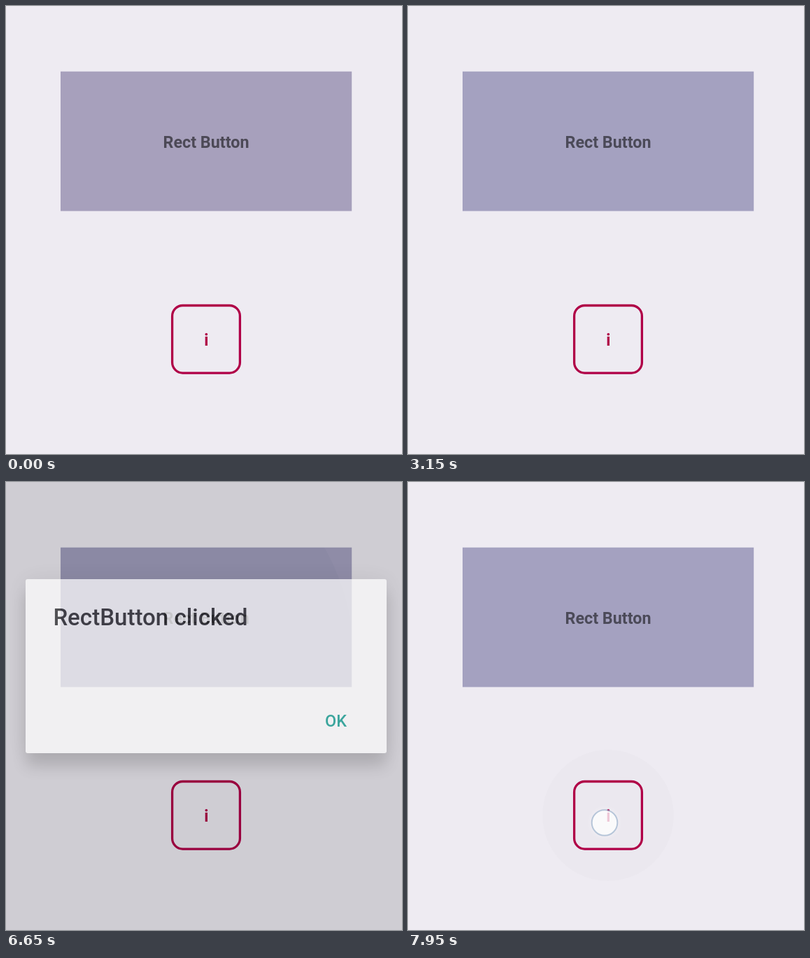
Recreate the animation shown at these times as an HTML page. Size 566 px wide and 641 px high, loop 8 s.

```html
<!DOCTYPE html>
<html lang="en">
<head>
<meta charset="utf-8">
<title>Buttons</title>
<style>
  html, body { margin: 0; width: 100%; height: 100%; overflow: hidden; background: #eeebf2; }
  svg, #dialog { position: absolute; left: 0; top: 0; width: 566px; height: 641px; display: block; }
  text { font-family: Roboto, Inter, sans-serif; font-size: 23.33px; }
  .bold { font-weight: 700; }
  .medium { font-weight: 500; }
  #dialog { overflow: hidden; }
  #card {
    position: absolute; left: 28px; top: 139px; width: 516px; height: 249px;
    border-radius: 3px; background: #fff;
    box-shadow: 0 20px 22px rgba(0, 0, 0, .19), 0 2px 32px rgba(0, 0, 0, .11);
  }
</style>
</head>
<body>
<svg viewBox="0 0 566 641">
  <defs>
    <clipPath id="rectClip"><rect x="78" y="93.7" width="416.2" height="199.7"/></clipPath>
  </defs>
  <rect width="566" height="641" fill="#eeebf2"/>
  <rect id="button" x="78" y="93.7" width="416.2" height="199.7"/>
  <g clip-path="url(#rectClip)"><circle id="rectRipple"/></g>
  <text class="bold" x="286" y="203" text-anchor="middle" fill-opacity=".54">Rect Button</text>

  <circle id="iconRipple" cx="286" cy="477" r="94"/>
  <rect x="237.6" y="428.5" width="96.8" height="96.6" rx="15" fill="none" stroke="#b00047" stroke-width="3.3"/>
  <text class="bold" x="286.3" y="486" text-anchor="middle" fill="#b00047">i</text>

  <rect id="dim" width="566" height="641"/>
</svg>

<div id="dialog">
  <div id="card"></div>
  <svg viewBox="0 0 566 641">
    <rect id="okPress" x="425" y="312" width="92" height="59" rx="3"/>
    <text class="medium" x="67.4" y="205" style="font-size:33.1px" fill="#1f1f21">RectButton clicked</text>
    <text class="medium" x="471.5" y="350" text-anchor="middle" fill="#009688">OK</text>
  </svg>
</div>

<svg viewBox="0 0 566 641">
  <defs>
    <radialGradient id="glow">
      <stop offset=".7" stop-color="#fff" stop-opacity=".22"/>
      <stop offset="1" stop-color="#fff" stop-opacity="0"/>
    </radialGradient>
  </defs>
  <g id="pointer">
    <circle r="25" fill="url(#glow)"/>
    <circle r="18" fill="#fff" fill-opacity=".72"/>
    <circle r="18.3" fill="none" stroke="#7d9bbd" stroke-opacity=".5" stroke-width="2"/>
  </g>
</svg>

<script>
  const LOOP = 8000;
  const el = id => document.getElementById(id);
  const show = (id, opacity) => { el(id).style.opacity = opacity; };

  // Timing rules, all in ms
  const ramp = (t, from, span) => Math.min(1, Math.max(0, (t - from) / span));
  const smooth = x => x * x * (3 - 2 * x);
  const pulse = (t, on, rise, off, fall) => ramp(t, on, rise) * (1 - ramp(t, off, fall));

  // Two drags out of the buttons, then three taps
  const touches = [
    { down: 1350, up: 3000, x: 250, y: 216, dx: -189, dy: 143 },
    { down: 4050, up: 5050, x: 322, y: 435, dx: -193, dy: 90, span: 850 },
    { down: 5900, up: 6350, x: 173, y: 255 },
    { down: 7150, up: 7300, x: 447, y: 345 },
    { down: 7850, up: LOOP, x: 281, y: 487.5 }
  ];
  const [rectDrag, , rectTap] = touches;

  function drawPointer(t) {
    const touch = touches.findLast(p => t >= p.down) || rectDrag;
    const { down, up, x, y, dx = 0, dy = 0, span = up - down } = touch;
    const along = ramp(t, down, span) ** 2;
    el('pointer').setAttribute('transform', `translate(${x + dx * along} ${y + dy * along})`);
    show('pointer', pulse(t, down, 100, up, 150));
  }

  function drawRipples(t) {
    const press = t < rectTap.down ? rectDrag : rectTap;
    const ripple = el('rectRipple');
    ripple.setAttribute('cx', press.x);
    ripple.setAttribute('cy', press.y);
    ripple.setAttribute('r', 480 * ramp(t, press.down + 100, 1060) ** 0.8);
    show('rectRipple', .06 * (pulse(t, 1350, 150, 2550, 450) + pulse(t, 6000, 100, 6400, 400)));
    show('iconRipple', .067 * (pulse(t, 4150, 250, 4800, 400) + ramp(t, 7900, 250)));
    show('okPress', .07 * pulse(t, 7200, 100, 7350, 150));
  }

  function drawDialog(t) {
    show('dim', .6 * (smooth(ramp(t, 6590, 205)) - smooth(ramp(t, 7300, 300))));
    show('dialog', pulse(t, 6580, 100, 7330, 100));
  }

  function draw(now) {
    const t = now % LOOP;
    el('button').setAttribute('fill', t < 950 ? '#a7a0bc' : '#a4a1c0');
    drawPointer(t);
    drawRipples(t);
    drawDialog(t);
  }

  const start = performance.now();
  function tick() {
    draw(performance.now() - start);
    requestAnimationFrame(tick);
  }
  tick();
</script>
</body>
</html>
```
